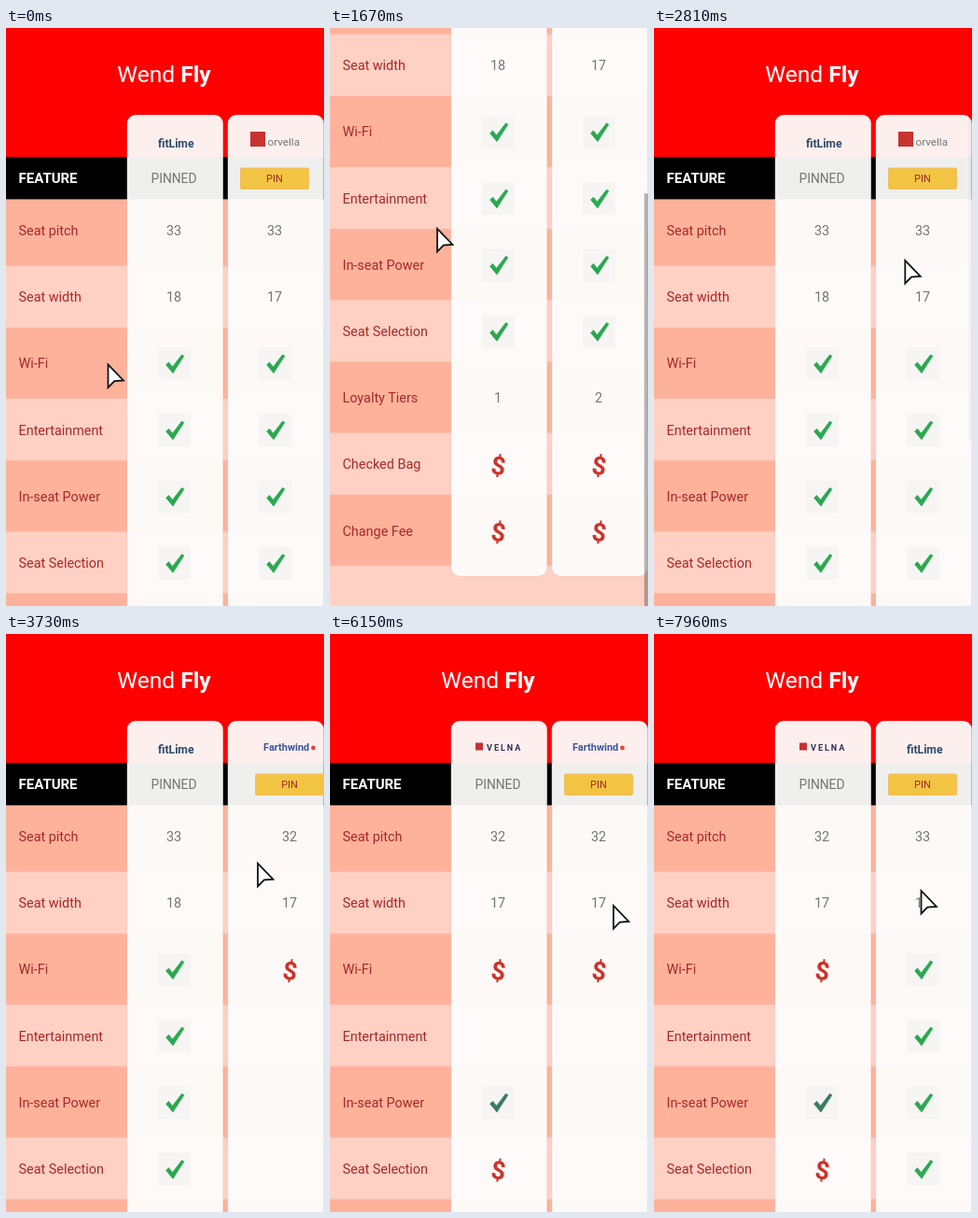
These frames come from a looping animation (341 px wide and 619 px high, 8 s). An HTML page:

```html
<!DOCTYPE html>
<html lang="en">
<head>
<meta charset="utf-8">
<title>Compare</title>
<style>
  html, body { margin: 0; width: 100%; height: 100%; overflow: hidden; background: #ffd0c4; }
  svg { display: block; }
  text { font-family: Roboto, sans-serif; font-size: 14.4px; }
  .label { fill: #a52a2a; }
  .value { fill: #757575; text-anchor: middle; }
  .small { font-size: 11px; fill: #a52a2a; text-anchor: middle; }
  .cash { font-size: 27px; font-weight: 700; fill: #cc332b; text-anchor: middle; }
</style>
</head>
<body>
<svg id="stage" width="341" height="619" viewBox="0 0 341 619"></svg>
<script>
const LOOP = 8000, CARD_W = 103, CARD_H = 742, PITCH = 104;
const LEFT = 130, RIGHT = 238;
const stage = document.getElementById('stage');

function el(parent, tag, attrs = {}, text) {
  const node = document.createElementNS('http://www.w3.org/2000/svg', tag);
  for (const k in attrs) node.setAttribute(k, attrs[k]);
  if (text !== undefined) node.textContent = text;
  parent.appendChild(node);
  return node;
}
const rect = (p, x, y, width, height, fill, more = {}) =>
  el(p, 'rect', { x, y, width, height, fill, ...more });
const rowY = i => 217 + 71.2 * i;
const move = (node, x, y) => node.setAttribute('transform', `translate(${x} ${y})`);
const fade = (node, o) => node.setAttribute('opacity', o);
const show = (node, on) => node.setAttribute('visibility', on ? 'visible' : 'hidden');

// Cell codes: y = included, $ = paid, empty = not offered
const features = ['Seat pitch', 'Seat width', 'Wi-Fi', 'Entertainment', 'In-seat Power',
  'Seat Selection', 'Loyalty Tiers', 'Checked Bag', 'Change Fee'];
const airlines = {
  lime: {
    cells: ['33', '18', 'y', 'y', 'y', 'y', '1', '$', '$'],
    logo: g => word(g, 33, 127.5, 'fitLime', '#2f4a68', 12.2, 700)
  },
  orvella: {
    cells: ['33', '17', 'y', 'y', 'y', 'y', '2', '$', '$'],
    logo(g) {
      rect(g, 24, 111, 16, 16, '#c8322f');
      word(g, 42.5, 126, 'orvella', '#777', 11.7, 400);
    }
  },
  farth: {
    cells: ['32', '17', '$', '', '', '', '2', 'y', 'y'],
    logo(g) {
      word(g, 22, 124.5, 'Farthwind', '#3c56a0', 11, 700);
      el(g, 'circle', { cx: 75.5, cy: 122, r: 2.4, fill: '#dd4b3a' });
    }
  },
  velna: {
    cells: ['32', '17', '$', '', 'y', '$', '3', '$', '$'],
    logo(g) {
      rect(g, 26, 116.5, 8, 8, '#c43136');
      word(g, 38, 124.5, 'VELNA', '#2c3152', 9, 700, 2);
    }
  }
};

function word(g, x, y, text, fill, size, weight, gap = 0) {
  el(g, 'text', { x, y, fill, style: `font-size:${size}px;font-weight:${weight};letter-spacing:${gap}px` }, text);
}

function column(parent, name, pinned, tick = '#2aa850') {
  const g = el(parent, 'g'), data = airlines[name];
  data.logo(g);
  if (pinned) {
    el(g, 'text', { x: 50, y: 166.3, class: 'value', style: 'font-size:13.8px' }, 'PINNED');
  } else {
    g.button = rect(g, 13.5, 150, 73, 22.5, '#f2c443', { rx: 1.5, stroke: '#f3bd62' });
    el(g, 'text', { x: 50, y: 165, class: 'small' }, 'PIN');
  }
  data.cells.forEach((c, i) => {
    const y = rowY(i);
    if (c === 'y') {
      rect(g, 33, y - 17.4, 35, 35, '#f7f5f4', { rx: 1 });
      el(g, 'path', {
        d: 'M-9.5 2L-6.5-1L-2.5 4L7.5-9L10-7.5L-2 11Z', fill: tick, stroke: tick,
        'stroke-width': .5, 'stroke-linejoin': 'round', transform: `translate(51 ${y - .6})`
      });
    } else if (c === '$') {
      el(g, 'text', { y: 10, class: 'cash', transform: `translate(50.7 ${y + .8}) rotate(7)` }, c);
    } else {
      el(g, 'text', { x: 50, y: y + 5, class: 'value' }, c);
    }
  });
  return g;
}

function card(parent, x) {
  const g = el(parent, 'g');
  rect(g, -.2, 93, CARD_W, CARD_H, '#fdfdfc', { rx: 9, 'fill-opacity': .945, stroke: '#000', 'stroke-opacity': .06 });
  g.body = el(g, 'svg', { width: CARD_W, height: 867, overflow: 'hidden' });
  move(g, x, 0);
  return g;
}

// Page
const page = el(stage, 'g');
rect(page, 0, 0, 341, 867, '#ffd0c4');
for (let k = 0; k < 5; k++) rect(page, 0, 178.5 + 142.3 * k, 341, 76.2, '#feb29b');
rect(page, 0, 0, 341, 139, '#fe0000');
rect(page, 0, 138.2, 341, 45.2, '#000');
const title = el(page, 'text', { x: 169.5, y: 58, fill: '#fff', 'text-anchor': 'middle', style: 'font-size:24.6px' }, 'Wend ');
el(title, 'tspan', { 'font-weight': 700 }, 'Fly');
el(page, 'text', { x: 13.5, y: 166.2, fill: '#fff', style: 'font-size:15px;font-weight:700' }, 'FEATURE');
features.forEach((f, i) => el(page, 'text', { x: 13.5, y: rowY(i) + 5, class: 'label' }, f));

const pinCard = card(page, LEFT);
const oldPin = column(pinCard.body, 'lime', true);
const newPin = column(pinCard.body, 'velna', true, '#397b61');

const pickCard = card(page, RIGHT);
const strip = names => {
  const g = el(pickCard.body, 'g');
  g.items = names.map(n => column(g, n, false));
  return g;
};
const before = strip(['orvella', 'farth', 'velna']);
const after = strip(['lime', 'orvella', 'farth']);

const flyer = card(page, RIGHT);
column(flyer.body, 'velna', true);

const bar = rect(stage, 337, 0, 4, 442, '#000');
const cursor = el(stage, 'g');
el(cursor, 'path', { d: 'M0 0V24.5L6.8 17.6L16.4 17Z', fill: '#fff', stroke: '#111', 'stroke-width': 1.8 });
const touch = el(cursor, 'circle', { cx: .5, cy: .5, r: 12, fill: '#ffdf3a' });

// Timing
const ease = {
  lin: p => p,
  in: p => p * p,
  out: p => 1 - (1 - p) ** 2,
  both: p => p * p * (3 - 2 * p)
};

// Keys are [time, value(s)..., easing into the key]
function at(keys, t, n = 1) {
  let i = keys.findIndex(k => k[0] > t);
  if (i < 0) return keys[keys.length - 1][n];
  if (i === 0) return keys[0][n];
  const a = keys[i - 1], b = keys[i], last = b[b.length - 1];
  const f = ease[last] || ease.both;
  return a[n] + (b[n] - a[n]) * f((t - a[0]) / (b[0] - a[0]));
}

const scrollKeys = [[720, 0], [1112, 154, 'lin'], [1250, 248, 'out'],
  [1720, 248], [2040, 49, 'lin'], [2130, 0, 'out']];
const cursorKeys = [[200, 109.5, 360.5], [600, 112, 369], [720, 112, 369], [1112, 115, 215, 'lin'],
  [1720, 115, 215], [2040, 123.5, 413, 'lin'], [2390, 123, 413],
  [2810, 269, 249, 'in'], [3140, 318, 246, 'out'], [3290, 318, 246], [3600, 262, 246],
  [3650, 262, 246], [3990, 318, 244], [4090, 318, 244], [4400, 262, 240],
  [4620, 299.5, 239], [4850, 303, 164], [5080, 303, 164], [5230, 290, 155], [5560, 290, 155],
  [6150, 304, 291], [6290, 268, 288], [6420, 268, 288], [6740, 318, 286], [6790, 318, 286],
  [7140, 266, 284], [7220, 266, 284], [7530, 318, 280], [7940, 286.5, 275]];
const pickKeys = [[3290, 0], [3600, .54], [3900, 1, 'out'], [4090, 1], [4400, 1.54], [4600, 2, 'out'],
  [6420, 2], [6740, 1.5], [7060, 1, 'out'], [7220, 1], [7530, .5], [7880, 0, 'out']];
const barKeys = [[700, 0], [760, .28], [2400, .28], [2800, .03], [2900, 0]];
const presses = [[690, 1110], [1690, 2040], [3270, 3600], [4080, 4400], [6410, 6740], [7210, 7530]];
const PIN = 5540, SETTLED = 5980;

function draw(t) {
  const scroll = Math.round(at(scrollKeys, t)), pos = at(pickKeys, t);
  move(page, 0, -scroll);
  bar.setAttribute('y', scroll * .714);
  fade(bar, at(barKeys, t));

  const pinned = t >= PIN, flying = pinned && t < SETTLED;
  show(before, !pinned);
  show(after, pinned);
  const slack = pinned ? 0 : pos;
  (pinned ? after : before).items.forEach((g, i) => move(g, (i - pos) * PITCH + slack, 0));
  fade(after, at([[PIN, 0], [SETTLED, 1]], t));
  before.items[2].button.setAttribute('fill', t >= 5370 ? '#eebb38' : '#f2c443');

  show(oldPin, t < SETTLED);
  fade(oldPin, at([[PIN, 1], [SETTLED - 80, 0]], t));
  show(newPin, t >= SETTLED);
  flyer.setAttribute('display', flying ? 'inline' : 'none');
  move(flyer, at([[PIN, RIGHT], [SETTLED, LEFT]], t), 0);

  move(cursor, at(cursorKeys, t, 1), at(cursorKeys, t, 2));
  fade(touch, Math.max(...presses.map(([a, b]) => at([[a, 0], [a + 60, .72], [b, .72], [b + 90, 0]], t))));
}

const start = performance.now();
function tick() {
  draw((performance.now() - start) % LOOP);
  requestAnimationFrame(tick);
}
tick();
</script>
</body>
</html>
```
